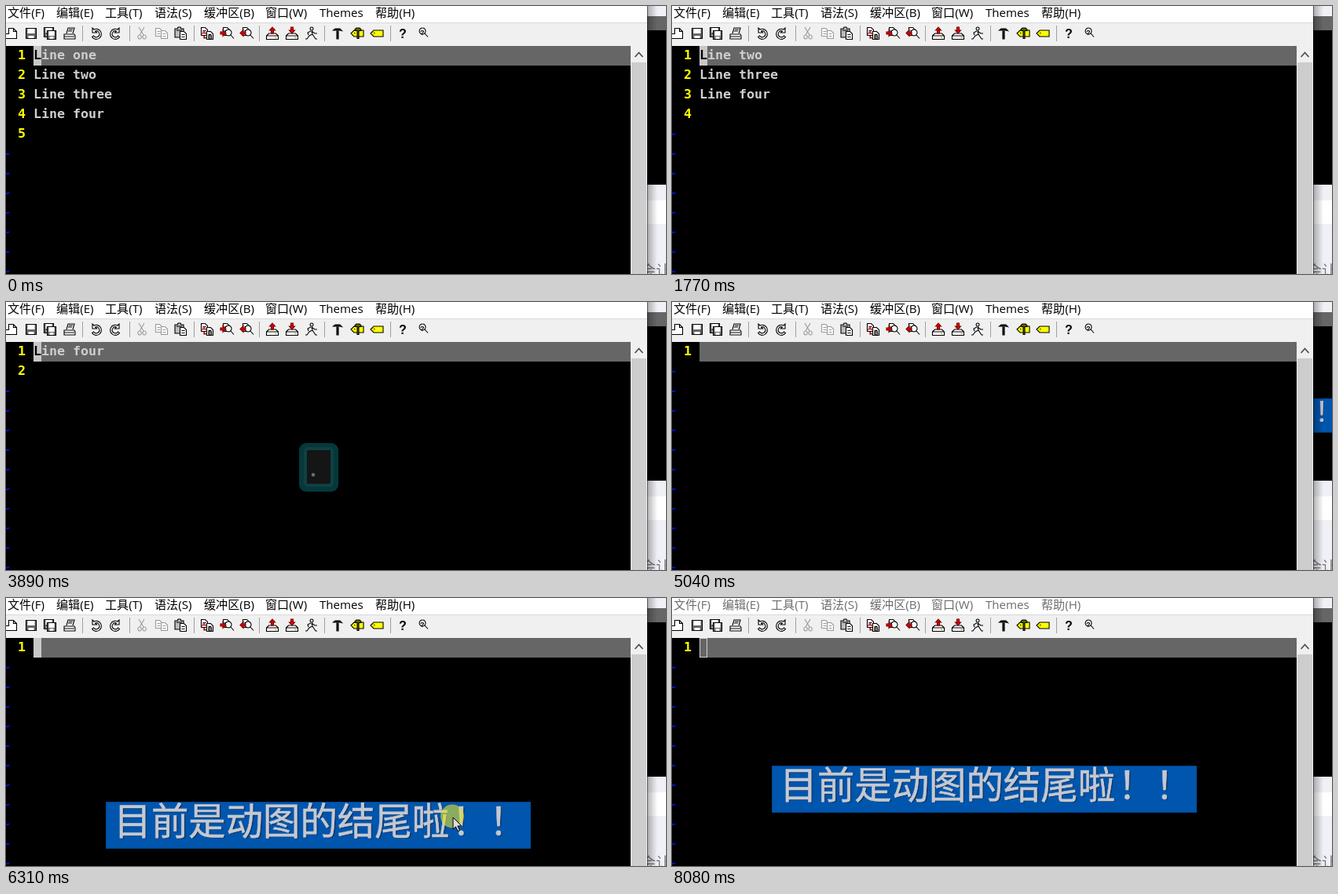
These frames come from a looping animation (840 by 342 pixels, 8160 ms). An HTML page:

```html
<!DOCTYPE html>
<html lang="zh-CN">
<head>
<meta charset="utf-8">
<style>
html, body { margin: 0; width: 100%; height: 100%; overflow: hidden; background: #000; }
svg { display: block; width: 840px; height: 342px; }
rect { shape-rendering: crispEdges; }
.menu { font: 15.1px "Open Sans", "Noto Sans CJK SC", sans-serif; }
.code { font: bold 16.6px "DejaVu Sans Mono", monospace; white-space: pre; }
.cjk { font-family: "Noto Sans CJK SC", sans-serif; }
.ico { fill: none; stroke: #000; stroke-width: 1.1; }
</style>
</head>
<body>
<svg viewBox="0 0 840 342">
  <defs>
    <linearGradient id="shade">
      <stop offset="0" stop-opacity=".3"/>
      <stop offset="1" stop-opacity="0"/>
    </linearGradient>
    <g id="words" class="cjk" font-size="47.4">
      <text>目前是动图的结尾啦<tspan dx="3.5">！！</tspan></text>
    </g>
    <g id="label">
      <rect width="540" height="59" fill="#0055ad" stroke="#00468f"/>
      <use href="#words" x="11.5" y="42.5" fill="#12305c"/>
      <use href="#words" x="10" y="41" fill="#c3c9d2" stroke="#c3c9d2" stroke-width=".6"/>
    </g>
  </defs>

  <g id="page">
    <rect x="816" width="24" height="342" fill="#f0f1f6"/>
    <rect x="816" y="13" width="24" height="18" fill="#666"/>
    <rect x="816" y="31" width="24" height="197" fill="#000"/>
    <rect x="816" y="248" width="24" height="30" fill="#fff"/>
    <text class="cjk" x="808" y="345" font-size="19" fill="#77777c">会让</text>
    <use id="strip" href="#label" transform="translate(460 123) scale(.735)"/>
    <rect x="816" width="13" height="342" fill="url(#shade)"/>
  </g>

  <g id="window">
    <rect width="816" height="342" fill="#000"/>
    <rect width="816" height="22" fill="#fff"/>
    <rect y="21" width="816" height="1" fill="#d8d8d8"/>
    <rect y="22" width="816" height="29" fill="#f0f0f0"/>
    <g id="menu" class="menu"></g>
    <g id="tools"></g>
    <rect x="35" y="51" width="760" height="25" fill="#666"/>
    <rect x="795" y="51" width="21" height="291" fill="#f0f0f0"/>
    <rect x="796" y="72" width="19" height="270" fill="#cdcdcd"/>
    <path d="M800.5 65l5-5.5 5 5.5" fill="none" stroke="#505050" stroke-width="1.8"/>
    <rect x="816" width="1" height="342" opacity=".5"/>
    <g id="rows" class="code"></g>
    <rect id="block" x="35" y="51" width="10" height="25" fill="#c8c8c8"/>
    <rect id="hollow" x="35.5" y="51.5" width="9" height="24" fill="none" stroke="#d0d0d0"/>
    <text id="under" class="code" x="35" y="68" fill="#000">L</text>
  </g>

  <g id="key">
    <rect x="373" y="180" width="50" height="62" rx="9" fill="#0a7176" style="shape-rendering:auto"/>
    <rect x="379" y="185" width="38" height="51" rx="5" fill="#1d8186" style="shape-rendering:auto"/>
    <rect x="383" y="189" width="30" height="43" rx="2" fill="#2b2b2b"/>
    <text id="letter" x="388" y="221" font-family="Inter, sans-serif" font-size="25" fill="#c4f2f2">D</text>
    <circle id="dot" cx="391" cy="220.5" r="2.2" fill="#b4f0f4"/>
  </g>

  <use id="banner" href="#label"/>
  <g id="mouse">
    <circle cx="-1" cy="-1.5" r="15" fill="#e0e030" opacity=".62"/>
    <path d="M0 0v15l3.4-3.2 2.6 5.8 2.4-1.1-2.5-5.6h4.9z" fill="#ddd" stroke="#000"/>
  </g>
</svg>

<script>
const $ = id => document.getElementById(id);
const LOOP = 8160;
const LINES = ['Line one', 'Line two', 'Line three', 'Line four'];
const CUTS = [840, 2340, 3420, 4350];      // a line goes at each key press
const HOLD = [1240, 2720, 3820, 4750];     // each key starts to fade
const BLINKS = [[1520, 1770], [2170, 2340], [3040, 3290], [4120, 4350],
  [5040, 5290], [5830, 5990], [6380, 6630], [7150, 7400]];
const PATH = [[5990, 838, 150], [6310, 569, 280], [6690, 548, 296],
  [7150, 548, 296], [7500, 690, 300], [7900, 800, 352]];

$('menu').innerHTML = [[2, '文件(F)'], [64, '编辑(E)'], [126, '工具(T)'], [189, '语法(S)'],
  [252, '缓冲区(B)'], [330, '窗口(W)'], [399, 'Themes'], [470, '帮助(H)']]
  .map(([x, s]) => `<text x="${x}" y="14">${s}</text>`).join('');

// Toolbar icons, each on a 16 px cell
const p = (d, fill = 'none', stroke = '#000') => `<path d="${d}" fill="${fill}" stroke="${stroke}"/>`;
const red = d => p(d, '#d00', '#700');
const sheet = (x, y, c) => p(`M${x} ${y}h5l3 3v7h-8zM${x + 2} ${y + 4}h4M${x + 2} ${y + 7}h4`, '#fff', c);
const disk = (x, y, s) => p(`M${x} ${y}h${s}v${s}h-${s}z`, '#666') +
  p(`M${x + 2.5} ${y + 1}h${s - 5}v5h-${s - 5}zM${x + 3.5} ${y + s - 3}h${s - 7}v2h-${s - 7}z`, '#fff', '#fff');
const lens = (x, y) => p(`M${x} ${y}a4 4 0 1 0 .1 0M${x + 3} ${y + 7}l4 4.5`, '#fff');
const tray = p('M0.5 11l3-3h9l3 3v4.5h-15zM1 11h14', '#fff') + p('M11 13.3h2', 'none', '#a90');
const curl = p('M3 1v6h5.5L6.500 5a4 4 0 1 1-2 6l-2 1.500a6.500 6.500 0 1 0 2.500-9.500z', '#fff');
const word = (x, y, s, size, fill = '#000') =>
  `<text x="${x}" y="${y}" font-family="Liberation Sans, sans-serif" font-weight="bold" font-size="${size}" fill="${fill}" stroke="none">${s}</text>`;
const tag = p('M0 8l4-4h12v8h-12z', '#ff0') + p('M4 7.5h1.5');
const find = arrow => sheet(3.5, 0.5, '#000') + lens(10, 3) + red(arrow);

const ICONS = [
  [7, p('M4.5 1.500h6l4 4v9h-14v-6h4zM10.500 1.500v4h4', '#fff')],
  [32, disk(1.5, 1.5, 13)],
  [56, disk(0.5, 0.5, 12) + disk(4.5, 4.5, 11)],
  [81, p('M4 8l2-7h8l-2 7', '#fff') + p('M1 9h13l1 2v4h-14zM1 12h13M7 3h5M6 5h5', '#fff')],
  [115, curl],
  [139, `<g transform="matrix(-1 0 0 1 16 0)">${curl}</g>`],
  [173, p('M4 0l6 10M11 0l-6 10M5 10a2.2 2.5 0 1 0 .1 0M11 10a2.2 2.5 0 1 0 .1 0', 'none', '#999')],
  [198, sheet(0.5, 1.5, '#999') + sheet(7.5, 4.5, '#999')],
  [222, p('M1 2h3l1-2h3l1 2h3v11h-11zM3 4h7', '#bbb') + sheet(7.5, 5.5, '#000')],
  [256, sheet(0.5, 0.5, '#000') + sheet(7.5, 5.5, '#000') + word(1, 9, 'A', 8, '#b00') + word(9, 15, 'B', 8) + red('M4 11v3h3')],
  [281, find('M0 6h3v-2.500l4 4-4 4v-2.500h-3z')],
  [306, find('M7 6h-3v-2.500l-4 4 4 4v-2.500h3z')],
  [339, tray + red('M8 0l3.500 4h-2v4h-3v-4h-2z')],
  [364, tray + red('M8 8l3.500-4h-2v-4h-3v4h-2z')],
  [389, p('M8 0a2 2 0 1 0 .1 0M7 5l-4 2 1 3M8 5l1 4 4 6h2M9 9l-4 2-3 4h-2M8 5l4 3h3')],
  [422, p('M2.500 4l2.500-2h6l2.500 2.500-2.500-.5h-6z', '#000') + p('M7 5h2v10h-2z', '#000')],
  [447, tag + p('M5 3l2-2h4l2 2v1.500h-3v10h-2v-10h-3z', '#660')],
  [472, tag],
  [505, word(3, 14, '?', 16)],
  [530, lens(8, 1) + word(5, 10, '?', 9)]
];
$('tools').innerHTML =
  ICONS.map(([x, s]) => `<g class="ico" transform="translate(${x - 8} 27)">${s}</g>`).join('') +
  [97, 157, 239, 322, 405, 489].map(x => `<rect x="${x}" y="25" width="1" height="20" fill="#a0a0a0"/>`).join('');

const show = (id, on) => $(id).setAttribute('visibility', on ? 'visible' : 'hidden');
const place = (id, x, y) => $(id).setAttribute('transform', `translate(${x} ${y})`);

let drawn = -1;
function drawRows(cut) {
  if (cut === drawn) return;
  drawn = cut;
  const left = LINES.slice(cut);
  // An emptied buffer still holds one blank line
  const last = cut === 4 ? 1 : left.length + 1;
  let out = '';
  for (let i = 0; i < 12; i++) {
    const y = 68 + 25 * i;
    out += i < last
      ? `<text x="15" y="${y}" fill="#ff0">${i + 1}</text><text x="35" y="${y}" fill="#cfcfcf">${left[i] || ''}</text>`
      : `<text x="-5" y="${y + 1}" fill="#0014e0">~</text>`;
  }
  $('rows').innerHTML = out;
}

function keyAlpha(t) {
  for (let i = 0; i < 4; i++) {
    const start = i ? CUTS[i] : 460, d = t - HOLD[i];
    if (t >= start && d < 150) return d < 0 ? 1 : d < 70 ? .75 : .5;
  }
  return 0;
}

function moveMouse(t) {
  const i = PATH.findIndex(k => k[0] > t);
  show('mouse', i > 0);
  if (i < 1) return;
  const [t0, x0, y0] = PATH[i - 1], [t1, x1, y1] = PATH[i];
  const u = (t - t0) / (t1 - t0), e = u * u * (3 - 2 * u);
  place('mouse', x0 + (x1 - x0) * e, y0 + (y1 - y0) * e);
}

function draw(t) {
  const cut = CUTS.filter(c => t >= c).length;
  const focus = t < 7600;
  const on = focus && !BLINKS.some(([a, b]) => t >= a && t < b);
  drawRows(cut);
  show('block', on);
  show('under', on && cut < 4);
  show('hollow', !focus);
  $('menu').setAttribute('fill', focus ? '#000' : '#6d6d6d');

  $('key').setAttribute('opacity', keyAlpha(t));
  show('letter', t < 2000);
  show('dot', t >= 2000);

  show('strip', t >= 4900 && t < 5990);
  show('banner', t >= 5430);
  place('banner', 127.5, t < 5830 ? 248.5 : t < 7150 ? 260.5 : 214.5);
  moveMouse(t);
}

function tick() {
  draw(performance.now() % LOOP);
  requestAnimationFrame(tick);
}
tick();
</script>
</body>
</html>
```
